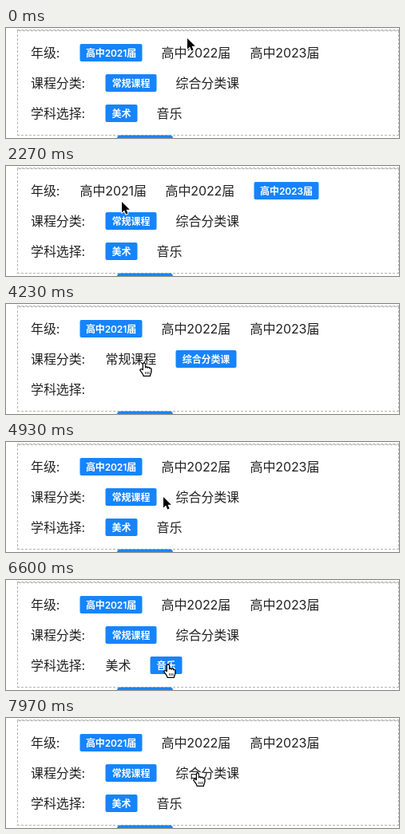
Animation of 492x138 px, one loop 8000 ms. Source, as an HTML page with a canvas:

```html
<!DOCTYPE html>
<html lang="zh-CN">
<head>
<meta charset="utf-8">
<title>课程筛选</title>
<style>
html, body { margin: 0; width: 100%; height: 100%; overflow: hidden; background: #fff; }
canvas { display: block; width: 492px; height: 138px; }
</style>
</head>
<body>
<canvas id="stage"></canvas>
<script>
const W = 492, H = 138, LOOP = 8000;
const BLUE = '#1684fc', INK = '#222', LINE = '#b4b4b4', MARK = '#73b5fd';
const FAMILY = 'Inter, "Noto Sans CJK SC", "Noto Sans CJK JP", sans-serif';
const TEXT = '16px ' + FAMILY, SMALL = '12px ' + FAMILY, BOLD = '600 ' + SMALL;

const canvas = document.getElementById('stage');
const ctx = canvas.getContext('2d');
const ratio = window.devicePixelRatio || 1;
canvas.width = W * ratio;
canvas.height = H * ratio;

const COMBINED = '综合分类课';
const rows = [
  { label: '年级:', x: 92.5, options: ['高中2021届', '高中2022届', '高中2023届'] },
  { label: '课程分类:', x: 124.5, options: ['常规课程', COMBINED] },
  { label: '学科选择:', x: 124.5, options: ['美术', '音乐'] }
];
rows.forEach((row, i) => row.y = 31 + 38 * i);

// places the pointer goes to, with the row and option found there
const start = { x: 227, y: 13 };
const first = { x: 112, y: 26, row: 0, option: 0 };
const second = { x: 220, y: 30, row: 0, option: 1 };
const third = { x: 320, y: 33, row: 0, option: 2 };
const general = { x: 160, y: 74, row: 1, option: 0 };
const combined = { x: 224, y: 67, row: 1, option: 1 };
const art = { x: 148, y: 104, row: 2, option: 0 };
const music = { x: 203, y: 106, row: 2, option: 1 };
const end = { x: 240, y: 69 };

// a clicked place is chosen as the pointer leaves; sag bends the way there
const visits = [];
const go = (place, arrive, leave, { dx = 0, sag = 0, click = false } = {}) =>
  visits.push({ ...place, x: place.x + dx, arrive, leave, sag, click });
const pick = (place, arrive, leave, more) => go(place, arrive, leave, { ...more, click: true });

go(start, 0, 0);
go(second, 170, 400, { dx: 11 });
pick(second, 800, 1000, { sag: 13 });
pick(third, 1600, 1800, { sag: -4 });
pick(first, 2430, 2630, { sag: 25 });
pick(combined, 3000, 3170);
pick(general, 3600, 3700);
pick(combined, 3930, 4000);
go(general, 4230, 4370, { dx: 11 });
pick(general, 4470, 4700, { dx: -15 });
pick(combined, 5030, 5100);
go(general, 5500, 5670);
pick(general, 5730, 5900, { dx: -3 });
pick(music, 6430, 6600);
pick(art, 7000, 7100);
go(general, 7530, 7670, { dx: -11 });
go(end, 7970, LOOP);

const handShape = new Path2D('M-1.6 8.6V1.4a1.5 1.5 0 0 1 3 0V6a1.3 1.3 0 0 1 2.6.3' +
  'a1.3 1.3 0 0 1 2.6.6a1.2 1.2 0 0 1 2.2.9V11c0 2-1.4 2.6-1.4 5.4H-.8' +
  'C-1.2 13.5-3.6 11.6-4.8 9.4c-.9-1.7 1.3-2.4 2.2-1.2Z');
const handLines = new Path2D('M1.7 11v3M3.9 11v3M6 11v3');
const arrowShape = new Path2D('M0 0V13.5L3.1 10.6 5.2 15.6 7.6 14.6 5.5 9.7H9.8Z');

function choicesAt(t) {
  const chosen = [0, 0, 0];
  for (const v of visits) {
    if (!v.click || v.leave > t) continue;
    chosen[v.row] = v.option;
    // only the general course offers subjects
    if (v.row === 1) chosen[2] = v.option === 0 ? 0 : -1;
  }
  return chosen;
}

function pointerAt(t) {
  const i = visits.findLastIndex(v => v.leave <= t);
  const from = visits[i], to = visits[i + 1];
  const u = Math.min(1, (t - from.leave) / (to.arrive - from.leave));
  const k = u * u * (3 - 2 * u);
  return {
    x: from.x + (to.x - from.x) * k,
    y: from.y + (to.y - from.y) * k + to.sag * Math.sin(Math.PI * u)
  };
}

function layout(row, chosen) {
  if (chosen < 0) return [];
  let x = row.x;
  return row.options.map((text, i) => {
    const active = i === chosen;
    ctx.font = active ? SMALL : TEXT;
    const w = Math.round(ctx.measureText(text).width) + (active ? 16 : 0);
    const item = { text, active, x, y: row.y, w };
    x += w + 24;
    return item;
  });
}

function write(text, x, y, font, color, align = 'left') {
  ctx.font = font;
  ctx.fillStyle = color;
  ctx.textAlign = align;
  ctx.fillText(text, x, y);
}

function box(x, y, w, h, r, color = BLUE) {
  ctx.fillStyle = color;
  ctx.beginPath();
  ctx.roundRect(x, y, w, h, r);
  ctx.fill();
}

function drawItem({ text, active, x, y, w }, over) {
  if (!active) return write(text, x, y + 6, TEXT, INK);
  box(x, y - 11, w, 22, 2);
  if (over && text === COMBINED) box(x + 20, y - 10, 12, 20, 0, MARK);
  write(text, x + w / 2, y + 4.5, BOLD, '#fff', 'center');
}

function dashed(x0, y0, x1, y1) {
  ctx.setLineDash([3, 2]);
  ctx.strokeStyle = LINE;
  ctx.lineWidth = 1;
  ctx.beginPath();
  ctx.moveTo(x0, y0);
  ctx.lineTo(x1, y1);
  ctx.stroke();
  ctx.setLineDash([]);
}

function drawFrame() {
  dashed(14, 2.5, W, 2.5);
  dashed(16, 3.5, W, 3.5);
  dashed(14.5, 3, 14.5, 135);
  dashed(W - 0.5, 3, W - 0.5, 135);
  dashed(14, 134.5, W, 134.5);
  box(139, 134.5, 70, 22, 4);
}

function drawPointer({ x, y }, hand) {
  ctx.save();
  ctx.translate(Math.round(x), Math.round(y));
  ctx.lineJoin = 'round';
  ctx.strokeStyle = hand ? '#000' : '#fff';
  ctx.fillStyle = hand ? '#fff' : '#000';
  ctx.lineWidth = hand ? 1.1 : 2;
  const shape = hand ? handShape : arrowShape;
  ctx.stroke(shape);
  ctx.fill(shape);
  if (hand) {
    ctx.stroke(shape);
    ctx.lineWidth = 0.8;
    ctx.stroke(handLines);
  }
  ctx.restore();
}

function draw(t) {
  ctx.setTransform(ratio, 0, 0, ratio, 0, 0);
  ctx.letterSpacing = '-0.1px';
  ctx.fillStyle = '#fff';
  ctx.fillRect(0, 0, W, H);
  drawFrame();
  const chosen = choicesAt(t), pointer = pointerAt(t);
  const isOver = ({ x, y, w }) =>
    pointer.x >= x && pointer.x <= x + w && Math.abs(pointer.y - y) <= 11;
  const items = rows.flatMap((row, i) => layout(row, chosen[i]));
  for (const row of rows) write(row.label, 31, row.y + 6, TEXT, INK);
  for (const item of items) drawItem(item, isOver(item));
  drawPointer(pointer, items.some(isOver));
}

// the pointer moves 30 times a second
function tick() {
  const step = Math.floor((performance.now() % LOOP) * 0.03 + 0.001);
  draw(Math.round(step * 10 / 3) * 10);
  requestAnimationFrame(tick);
}
tick();
</script>
</body>
</html>
```
